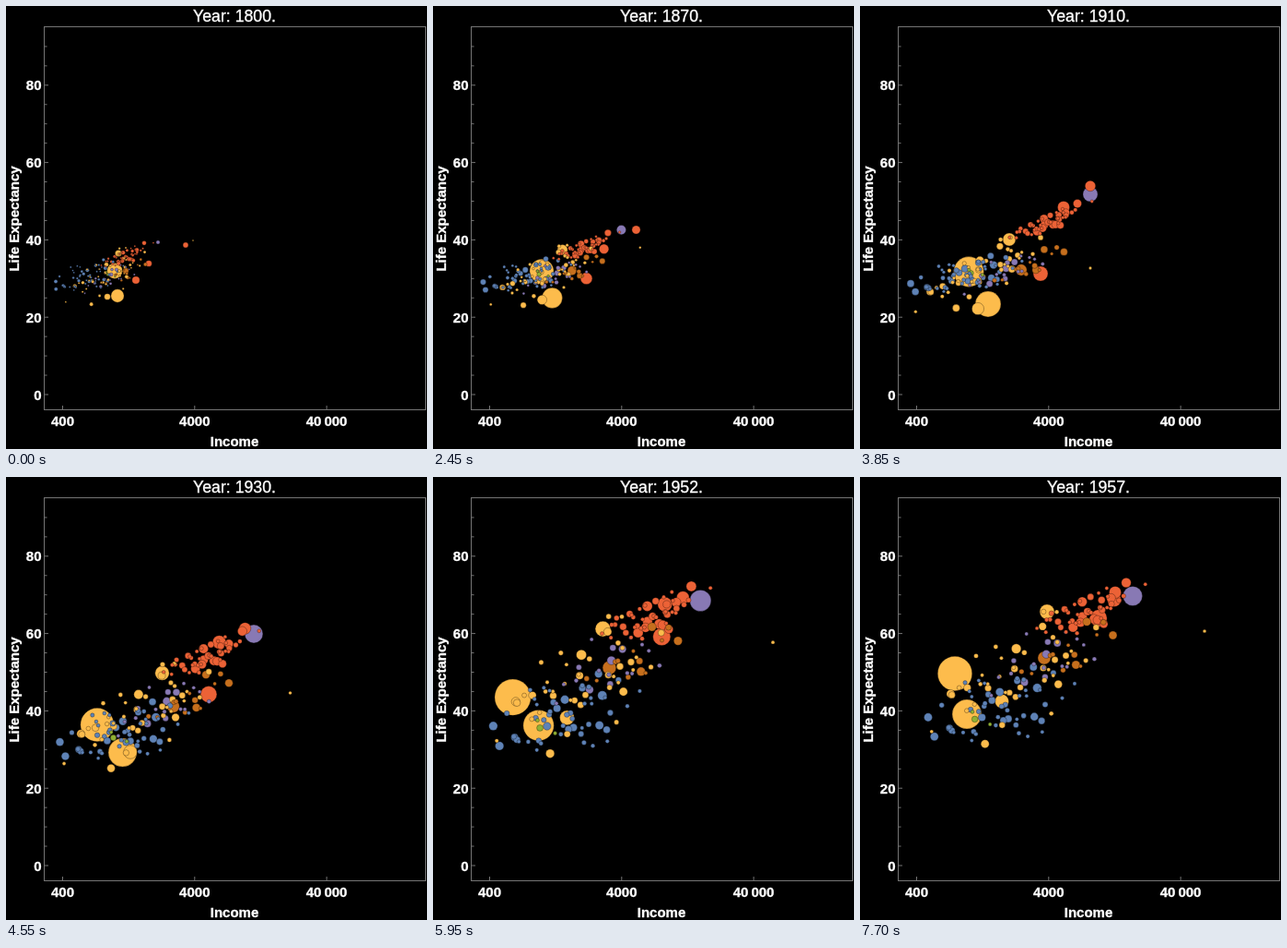
Write an HTML page that moves like this. It is 457x480 px and loops after 8 s.

```html
<!DOCTYPE html>
<html lang="en">
<head>
<meta charset="utf-8">
<title>Income and life expectancy</title>
<style>
html, body { margin: 0; width: 100%; height: 100%; overflow: hidden; background: #000; }
svg { display: block; }
text {
  font: bold 15px "Liberation Sans", Arial, sans-serif;
  fill: #fff; stroke: #fff; stroke-width: .35; text-anchor: middle;
}
#title { font-weight: normal; font-size: 17.7px; }
.axis { fill: none; stroke: #757575; }
circle { stroke: #000; stroke-opacity: .5; stroke-width: .6; }
</style>
</head>
<body>
<svg id="stage" width="457" height="480" viewBox="0 0 457 480">
  <g id="bubbles"></g>
  <g id="axes"></g>
  <text id="title" x="248" y="17"></text>
</svg>
<script>
const LOOP = 8000, STEP = 350, LAST_STEP = 22;
const KEY_YEARS = [1800, 1910, 1950, 1957];

// Each region: how many bubbles, cloud centre in 1800, 1910 and 1950, final spread, slope
const REGIONS = {
  asia: { color: '#fdbc4c', count: 42, x: [112, 135, 164], y: [290, 286, 222], spread: [40, 30], tilt: .5 },
  europe: { color: '#ec6236', count: 46, x: [126, 198, 227], y: [272, 236, 154], spread: [31, 11], tilt: .45 },
  africa: { color: '#5e82b6', count: 52, x: [87, 112, 137], y: [293, 292, 262], spread: [38, 21], tilt: .15 },
  north: { color: '#8879b4', count: 18, x: [117, 163, 196], y: [292, 285, 205], spread: [29, 19], tilt: .4 },
  south: { color: '#c66f1d', count: 13, x: [127, 183, 212], y: [288, 280, 196], spread: [28, 17], tilt: .4 },
  oceania: { color: '#90b033', count: 3, x: [114, 126, 120], y: [290, 288, 273], spread: [9, 7], tilt: .1 }
};

// The most prominent bubbles, placed at each key year
const LEADERS = [
  { region: 'asia', size: 20, x: [118, 118, 80, 103], y: [287, 288, 249, 213] },
  { region: 'asia', size: 17, x: [121, 139, 114, 116], y: [314, 323, 274, 257] },
  { region: 'asia', size: 8.5, x: [122, 162, 177, 203], y: [268, 253, 172, 146] },
  { region: 'asia', size: 8, x: [110, 128, 142, 154], y: [315, 328, 268, 243] },
  { region: 'asia', size: 2, x: [203, 250, 367, 374], y: [254, 284, 184, 167] },
  { region: 'north', size: 12, x: [165, 250, 288, 296], y: [256, 204, 136, 129], growth: 2 },
  { region: 'europe', size: 9.8, x: [141, 196, 244, 259], y: [297, 290, 181, 153] },
  { region: 'europe', size: 8, x: [155, 221, 242, 276], y: [279, 218, 140, 133] },
  { region: 'europe', size: 7, x: [195, 250, 269, 277], y: [259, 195, 133, 125] },
  { region: 'south', size: 7.5, x: [130, 175, 188, 200], y: [287, 286, 211, 196] }
];

const svgNode = (tag, attrs, parent) => {
  const node = document.createElementNS('http://www.w3.org/2000/svg', tag);
  for (const name in attrs) node.setAttribute(name, attrs[name]);
  return parent.appendChild(node);
};

let seed = 1741;
const random = () => (seed = (seed * 16807) % 2147483647) / 2147483647;
const bell = () => (random() + random() + random() - 1.5) * 2;

// A cloud widens over time; in the fifties all drift right and the lowest rise most.
function cloudBubble(region) {
  const { x: cx, y: cy, spread, tilt } = REGIONS[region];
  const u = bell() * spread[0], v = bell() * spread[1];
  const widen = [.48, .76, 1], heighten = [.38, .42, 1];
  const x = cx.map((c, i) => Math.max(54, c + u * widen[i]));
  const y = cy.map((c, i) => c + v * heighten[i] - tilt * u * widen[i]);
  x.push(x[2] + 12);
  y.push(y[2] - 6 - .05 * (y[2] - 130));
  return { region, x, y, size: 2.1 + 3.6 * random() ** 3 };
}

const bubbles = [...LEADERS];
for (const region in REGIONS)
  for (let i = 0; i < REGIONS[region].count; i++) bubbles.push(cloudBubble(region));
bubbles.sort((a, b) => b.size - a.size);

const layer = document.getElementById('bubbles');
for (const b of bubbles) b.node = svgNode('circle', { fill: REGIONS[b.region].color }, layer);

// Change is slow at first, health lagging behind income, and steady after 1910.
function valueAt(values, year, earlyPower) {
  const i = year < 1910 ? 0 : year < 1950 ? 1 : 2;
  const part = (year - KEY_YEARS[i]) / (KEY_YEARS[i + 1] - KEY_YEARS[i]);
  return values[i] + (values[i + 1] - values[i]) * (i ? part : part ** earlyPower);
}

const sizeScale = year => year <= 1950
  ? .42 + .58 * ((year - 1800) / 150) ** 1.2
  : 1 - .009 * (year - 1950);

function drawAxes() {
  const axes = document.getElementById('axes');
  const label = (text, x, y, extra) =>
    svgNode('text', { x, y, ...extra }, axes).textContent = text;
  const valueY = value => 421 - value * 4.19;
  let ticks = '';
  for (let value = 0; value <= 90; value += 5) {
    const major = value % 20 === 0;
    ticks += `M42 ${valueY(value)}h${major ? 4 : 2.5}`;
    if (major) label(value, 38.5, valueY(value) + 5.5, { style: 'text-anchor:end' });
  }
  ['400', '4000', '40\u2009000'].forEach((text, i) => {
    const x = 61.5 + i * 143.3;
    ticks += `M${x} 437v-4`;
    label(text, x, 455);
  });
  svgNode('path', { class: 'axis', d: ticks }, axes);
  svgNode('rect', { class: 'axis', x: 41.5, y: 22.5, width: 414, height: 415 }, axes);
  label('Income', 248, 476.5);
  label('Life Expectancy', 0, 0, { transform: 'translate(14 230.5) rotate(-90)' });
}

const title = document.getElementById('title');
let shownYear;

function draw(time) {
  const step = Math.min(LAST_STEP, Math.floor((time % LOOP) / STEP));
  const year = step <= 15 ? 1800 + step * 10 : 1935 + step;
  if (year === shownYear) return;
  shownYear = year;
  title.textContent = `Year: ${year}.`;
  const scale = sizeScale(year);
  for (const { node, x, y, size, growth = 1 } of bubbles) {
    node.setAttribute('cx', valueAt(x, year, 1.7).toFixed(2));
    node.setAttribute('cy', valueAt(y, year, 3).toFixed(2));
    node.setAttribute('r', (size * scale ** growth).toFixed(2));
  }
}

drawAxes();
draw(0);
let start;
function tick(now) {
  start ??= now;
  draw(now - start);
  requestAnimationFrame(tick);
}
requestAnimationFrame(tick);
</script>
</body>
</html>
```
